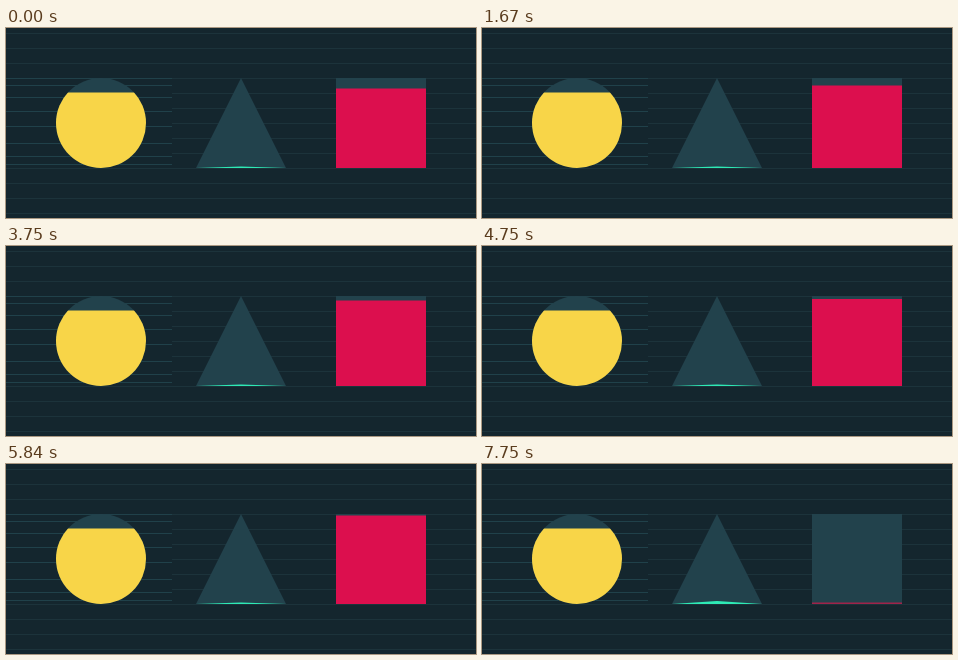
An HTML page with a canvas that plays this animation: 470x190 px, repeating every 8 s.

```html
<!DOCTYPE html>
<html lang="en">
<head>
<meta charset="utf-8">
<title>Shape clock</title>
<style>
html, body { margin: 0; width: 100%; height: 100%; overflow: hidden; background: #14262e; }
canvas { display: block; }
</style>
</head>
<body>
<canvas id="stage" width="470" height="190"></canvas>
<script>
const ctx = document.getElementById('stage').getContext('2d');
const LOOP = 8000, TOP = 50, SIZE = 90, BOTTOM = TOP + SIZE;
const TICKS = [670, 1670, 2750, 3750, 4750, 5750, 6750, 7750];
const HOUR_LINES = [50, 57, 69, 83, 98, 115, 128, 136];
const EMPTY = '#22424c';

function rect(color, x, y, w, h) {
  ctx.fillStyle = color;
  ctx.fillRect(x, y, w, h);
}

function disc(color) {
  ctx.fillStyle = color;
  ctx.beginPath();
  ctx.arc(95, 95, SIZE / 2, 0, Math.PI * 2);
  ctx.fill();
}

function triangle(color, height) {
  ctx.fillStyle = color;
  ctx.beginPath();
  ctx.moveTo(190, BOTTOM);
  ctx.lineTo(235, BOTTOM - height);
  ctx.lineTo(280, BOTTOM);
  ctx.fill();
}

function background() {
  rect('#14262e', 0, 0, 470, 190);
  for (let y = 5; y < 190; y += 15) {
    const inside = y >= TOP && y < BOTTOM;
    rect('#1c333b', inside ? 166 : 0, y, 470, 1);
  }
  for (const y of HOUR_LINES) rect('#20414a', 0, y, 166, 1);
}

function hours() {
  disc(EMPTY);
  ctx.save();
  ctx.beginPath();
  ctx.rect(0, 64.5, 166, 80);
  ctx.clip();
  disc('#f8d548');
  ctx.restore();
}

function draw(now) {
  const t = now % LOOP;
  const total = 113 + TICKS.filter(tick => t >= tick).length;
  const minute = Math.floor(total / 60), second = total % 60;
  const unit = SIZE / 60, fill = second * unit;

  background();
  hours();
  triangle(EMPTY, SIZE);
  triangle('#2eeab5', minute * unit);
  rect(EMPTY, 330, TOP, SIZE, SIZE);
  rect(second === 1 ? '#a0234a' : '#dc0f4e', 330, BOTTOM - fill, SIZE, fill);
}

const start = performance.now();
function frame() {
  draw(performance.now() - start);
  requestAnimationFrame(frame);
}
frame();
</script>
</body>
</html>
```
